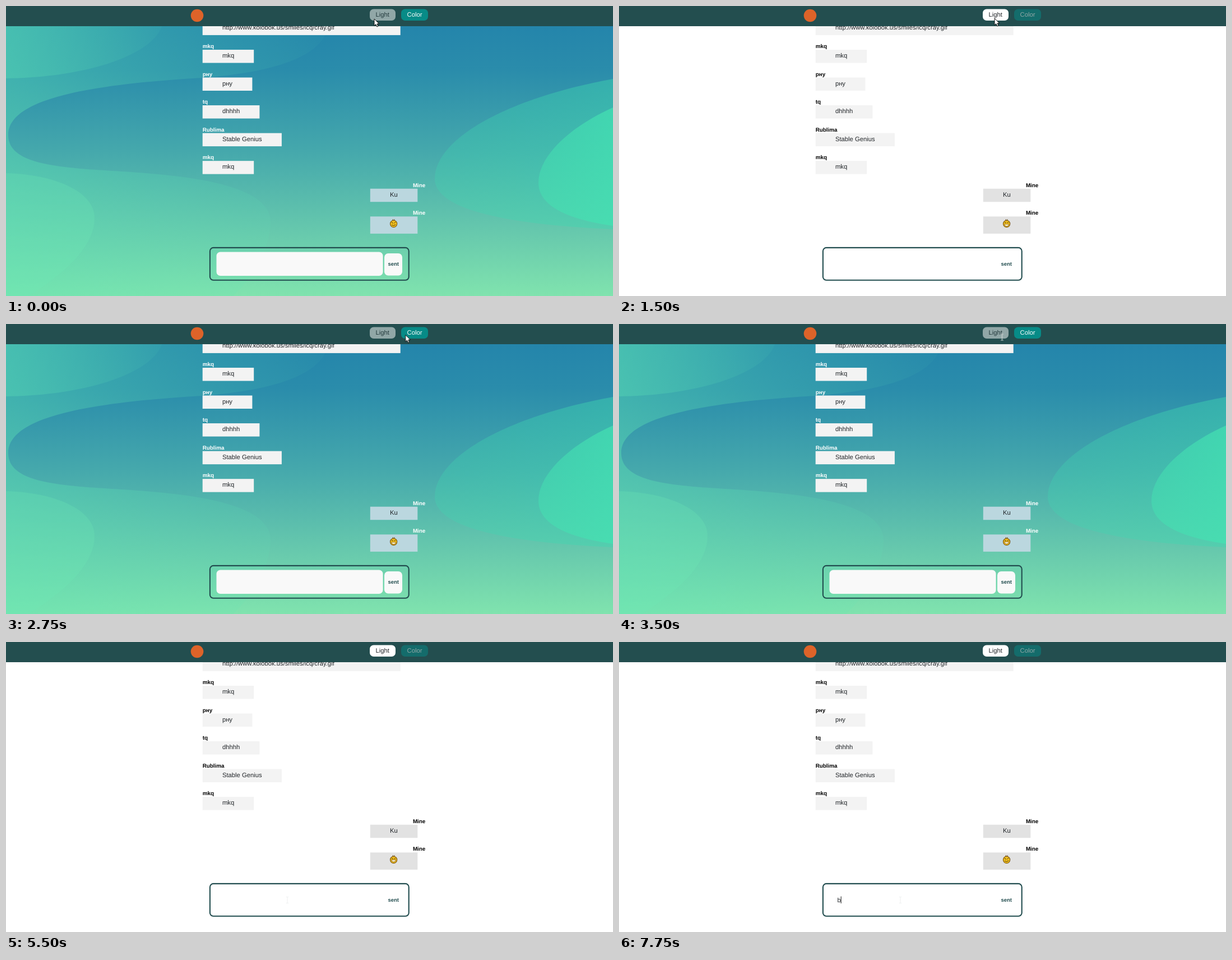
An HTML page for the animation above (8000 ms loop, 1083 px wide and 517 px high).

```html
<!DOCTYPE html>
<html lang="en">
<head>
<meta charset="utf-8">
<title>Chat themes</title>
<style>
  html, body { margin: 0; width: 100%; height: 100%; overflow: hidden; background: #fff; }
  svg { display: block; width: 1083px; height: 517px; }
  text {
    font: 11.26px "Liberation Sans", Arial, sans-serif;
    fill: #212529; text-rendering: geometricPrecision;
  }

  #stage { animation: theme 8s step-end infinite; }
  #scene { opacity: var(--scene); }
  .name { font-size: 9.86px; font-weight: bold; fill: var(--name); }
  .theirs { fill: #f3f3f3; }
  .mine { fill: var(--mine); }
  .field { fill: var(--field); }
  #light { opacity: var(--light); }
  #color { opacity: var(--color); }
  .sent { font-size: 9.39px; font-weight: bold; fill: #224d4f; }

  #face { animation: mood 8s step-end infinite; }
  #calm { opacity: var(--calm); }
  #laugh { opacity: var(--laugh); }
  #mouth { transform: translateY(var(--bob)); }

  #pointer { animation: move 8s step-end infinite; }
  #arrow { opacity: var(--arrow); }
  #beam { opacity: var(--beam); }
  #caret { animation: blink 8s step-end infinite; }
  #typed { animation: type 8s step-end infinite; }

  @keyframes theme {
    0%, 34.375% { --scene: 1; --name: #fff; --mine: #bbd7df; --field: #f9f9f9; --light: .5; --color: 1; }
    18.75%, 46.875%, 100% { --scene: 0; --name: #000; --mine: #e2e2e2; --field: #fff; --light: 1; --color: .5; }
  }
  @keyframes mood {
    0%, 46.875%, 93.75%, 100% { --calm: 1; --laugh: 0; --bob: 0px; }
    12.5%, 21.875%, 31.25%, 37.5%, 59.375%, 68.75%, 78.125%, 84.375% { --calm: 0; --laugh: 1; --bob: 0px; }
    18.75%, 28.125%, 34.375%, 65.625%, 75%, 81.25% { --calm: 0; --laugh: 1; --bob: .7px; }
  }
  @keyframes move {
    0% { transform: translate(657px, 23px); --arrow: 1; --beam: 0; }
    3.125% { transform: translate(670px, 22px); --arrow: 0; --beam: 1; }
    18.75% { transform: translate(670px, 22px); --arrow: 1; --beam: 0; }
    21.875% { transform: translate(686px, 23px); --arrow: 1; --beam: 0; }
    25% { transform: translate(705px, 22px); --arrow: 1; --beam: 0; }
    28.125% { transform: translate(712.7px, 19.5px); --arrow: 1; --beam: 0; }
    37.5% { transform: translate(702px, 22px); --arrow: 1; --beam: 0; }
    40.625% { transform: translate(686px, 23px); --arrow: 0; --beam: 1; }
    43.75% { transform: translate(683.5px, 23.5px); --arrow: 0; --beam: 1; }
    46.875% { transform: translate(671.5px, 23.5px); --arrow: 1; --beam: 0; }
    53.125% { transform: translate(650px, 250px); --arrow: 1; --beam: 0; }
    56.25%, 100% { transform: translate(502px, 460px); --arrow: 0; --beam: .55; }
  }
  @keyframes blink {
    0%, 68.75%, 81.25%, 93.75% { opacity: 0; transform: none; }
    62.5%, 75%, 87.5% { opacity: 1; transform: none; }
    96.875%, 100% { opacity: 1; transform: translateX(6px); }
  }
  @keyframes type {
    0% { opacity: 0; }
    96.875%, 100% { opacity: 1; }
  }
</style>
</head>
<body>
<svg id="stage" viewBox="0 0 1083 517">
  <defs>
    <linearGradient id="sky" x2="0" y2="1">
      <stop offset=".07" stop-color="#2485ab"/>
      <stop offset=".22" stop-color="#2a8cab"/>
      <stop offset=".5" stop-color="#45a8ac"/>
      <stop offset=".8" stop-color="#69cbad"/>
      <stop offset="1" stop-color="#80e3ae"/>
    </linearGradient>
    <linearGradient id="wave" gradientUnits="userSpaceOnUse" x1="0" x2="575">
      <stop offset="0" stop-color="#5ee6b4" stop-opacity=".4"/>
      <stop offset=".5" stop-color="#5ee6b4" stop-opacity=".2"/>
      <stop offset="1" stop-color="#5ee6b4" stop-opacity=".03"/>
    </linearGradient>
    <linearGradient id="corner" gradientUnits="userSpaceOnUse" x1="0" x2="278">
      <stop offset="0" stop-color="#5ce0b4" stop-opacity=".36"/>
      <stop offset="1" stop-color="#5ce0b4" stop-opacity=".06"/>
    </linearGradient>
    <linearGradient id="hill" gradientUnits="userSpaceOnUse" x1="765" x2="1083">
      <stop offset="0" stop-color="#3fd6b0" stop-opacity=".3"/>
      <stop offset="1" stop-color="#3fd6b0" stop-opacity=".46"/>
    </linearGradient>
    <linearGradient id="inner" gradientUnits="userSpaceOnUse" x1="950" x2="1083">
      <stop offset="0" stop-color="#44e2b2" stop-opacity=".5"/>
      <stop offset="1" stop-color="#44e2b2" stop-opacity=".72"/>
    </linearGradient>
  </defs>

  <g id="scene">
    <rect width="1083" height="517" fill="url(#sky)"/>
    <path fill="url(#wave)" d="M0 36H575C565 90 480 118 350 128C150 140 4 165 4 230C4 300 160 286 300 303C420 317 472 345 472 385C472 430 440 485 405 517H0Z"/>
    <path fill="url(#corner)" d="M0 36H278C262 85 150 127 0 129Z"/>
    <path fill="#6be6b4" fill-opacity=".25" d="M0 298C85 300 158 330 158 378C158 430 100 480 40 517H0Z"/>
    <path fill="url(#hill)" d="M1083 130C900 163 765 235 765 308C765 360 880 389 1083 398Z"/>
    <path fill="url(#inner)" d="M1083 181C1005 216 950 268 950 315C950 356 1000 380 1083 392Z"/>
  </g>

  <g id="rows"></g>

  <g id="face" transform="translate(691.6 388.3)">
    <path d="M-2-6L-1-8M0-6L2-8" fill="none" stroke="#6d4a0c" stroke-width="1.1"/>
    <circle r="6.1" fill="#f3c21f" stroke="#80560c" stroke-width="1.1"/>
    <g id="calm" fill="none" stroke="#4a3208">
      <path d="M-3.8-2.4L-.6-1M3.6-3L.8-1"/>
      <path d="M-3.4 2Q0 4.6 3.6 1.4"/>
    </g>
    <g id="laugh">
      <path d="M-3.6-2.2H-.8M.8-2.2H3.6" stroke="#4a3208"/>
      <path id="mouth" d="M-4 0H4Q3.6 3.8 0 3.8T-4 0Z" fill="#fff4cf" stroke="#80560c" stroke-width=".8"/>
    </g>
  </g>

  <rect width="1083" height="36" fill="#234e4f"/>
  <circle cx="341" cy="17" r="11.3" fill="#dd6329"/>
  <g id="light">
    <rect x="649" y="5.5" width="46" height="20.5" rx="7" fill="#fff"/>
    <text x="659.6" y="19.4">Light</text>
  </g>
  <g id="color">
    <rect x="705" y="5.5" width="48" height="20.5" rx="7" fill="#078b87"/>
    <text x="715.6" y="19.4" style="fill:#fff">Color</text>
  </g>

  <rect x="363.9" y="430.9" width="354.8" height="57.8" rx="6" fill="none" stroke="#224d4f" stroke-width="2.1"/>
  <rect class="field" x="375.5" y="438.5" width="297" height="42.5" rx="7"/>
  <rect class="field" x="675" y="441" width="32" height="39.5" rx="7"/>
  <text class="sent" x="681.6" y="463.4">sent</text>
  <text id="typed" x="389.5" y="463.6">b</text>
  <path id="caret" d="M390.2 453.5V466" stroke="#000" stroke-width=".9"/>

  <g id="pointer">
    <path id="arrow" d="M0 0V12.2L2.8 9.6L4.8 14L6.9 13.1L5 8.8H8.8Z" fill="#fff" stroke="#000" stroke-width=".9"/>
    <path id="beam" d="M-2.2-5.5H-.6L0-5L.6-5.5H2.2M0-5V5M-2.2 5.5H-.6L0 5L.6 5.5H2.2" fill="none" stroke="#dfe4e3" stroke-width="1"/>
  </g>
</svg>
<script>
  const rows = document.getElementById("rows");
  const PITCH = 49.55, PAD = 35.2;

  function add(tag, attrs, label = "") {
    const el = document.createElementNS("http://www.w3.org/2000/svg", tag);
    for (const key in attrs) el.setAttribute(key, attrs[key]);
    el.textContent = label;
    rows.append(el);
  }

  // author, text, box width
  const chat = [
    ["", "http://www.kolobok.us/smiles/icq/cray.gif", 353],
    ["mkq", "mkq", 91.5],
    ["рну", "рну", 88.7],
    ["tq", "dhhhh", 101.7],
    ["Rublima", "Stable Genius", 141.2],
    ["mkq", "mkq", 91.5],
    ["Mine", "Ku", 84.5],
    ["Mine", "", 84.5]
  ];

  chat.forEach(([author, words, width], i) => {
    const own = author === "Mine";
    const x = own ? 649.8 : 350.7;
    const y = 28.4 + i * PITCH;
    add("text", { class: "name", x: own ? 725.9 : x, y: y - 2.9 }, author);
    add("rect", { class: own ? "mine" : "theirs", x, y, width, height: words ? 23.5 : 30.6 });
    add("text", { x: x + PAD, y: y + 14 }, words);
  });
</script>
</body>
</html>
```
